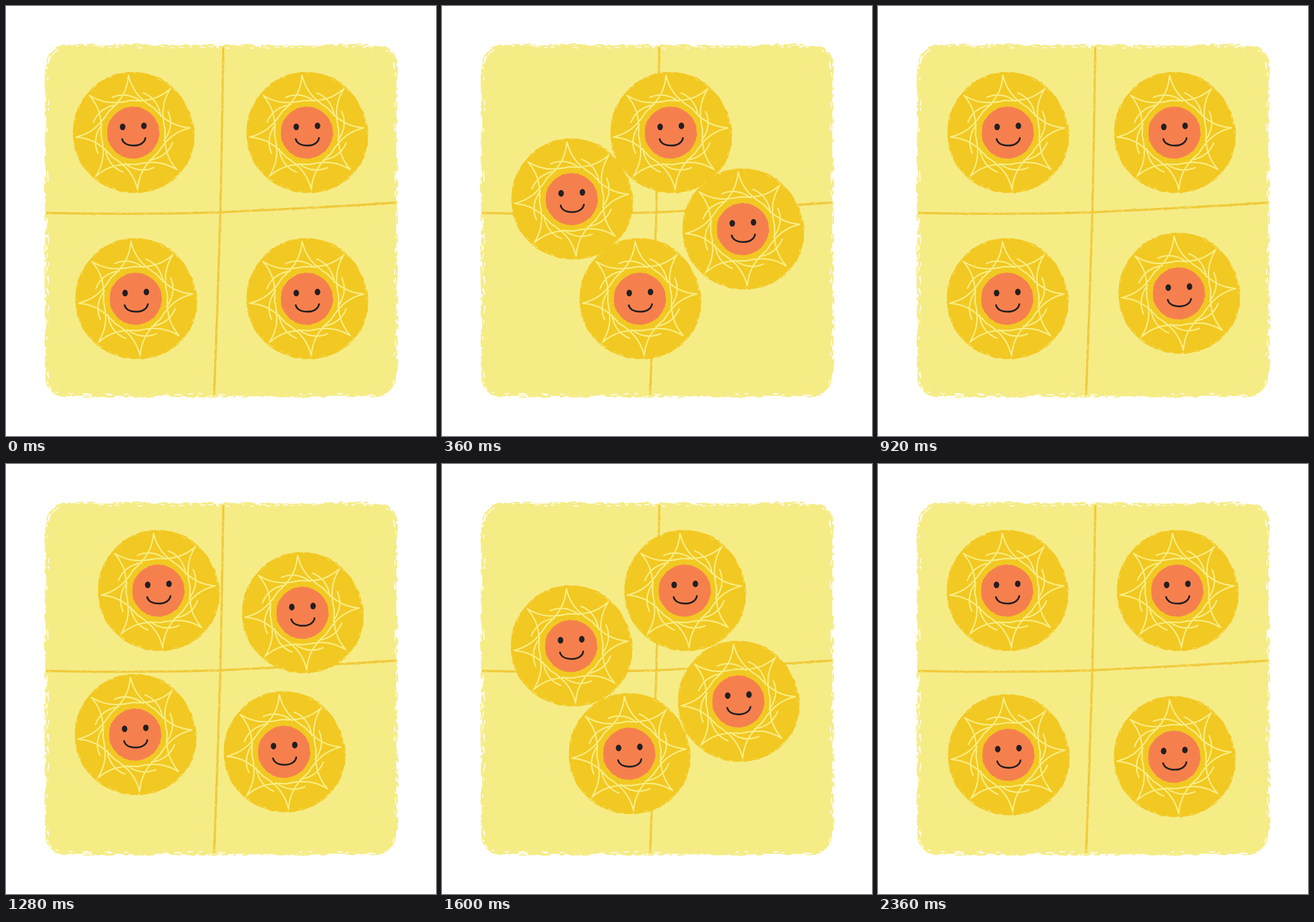
Animation of 748 by 748 pixels, one loop 2400 ms. Source, as an HTML page:

```html
<!DOCTYPE html>
<html lang="en">
<head>
<meta charset="utf-8">
<title>Circling suns</title>
<style>
html, body { margin: 0; width: 100%; height: 100%; overflow: hidden; background: #fff; }
svg { display: block; width: 748px; height: 748px; }
path { stroke-linecap: round; stroke-linejoin: round; }
</style>
</head>
<body>
<svg id="stage" viewBox="0 0 748 748"></svg>
<script>
const PALE = '#f6ec86', GOLD = '#f2c822', LINE = '#f0ca3c', INK = '#231f20';
const stage = document.getElementById('stage');

let seed = 7;
const random = () => (seed = seed * 16807 % 2147483647) / 2147483647;
const between = (a, b) => a + (b - a) * random();

function add(parent, name, attributes) {
  const node = document.createElementNS('http://www.w3.org/2000/svg', name);
  for (const key in attributes) node.setAttribute(key, attributes[key]);
  return parent.appendChild(node);
}
const stroke = (parent, d, colour, width) =>
  add(parent, 'path', { d, fill: 'none', stroke: colour, 'stroke-width': width });

// Scatter short chalk dashes along an outline, at an offset between near and far.
function chalk(parent, outline, colour, count, near, far, width, longest) {
  const total = outline.getTotalLength();
  let d = '';
  for (let i = 0; i < count; i++) {
    const start = random() * total;
    const a = outline.getPointAtLength(start);
    const b = outline.getPointAtLength(Math.min(total, start + between(2, longest)));
    const length = Math.hypot(b.x - a.x, b.y - a.y) || 1;
    const nx = (b.y - a.y) / length, ny = (a.x - b.x) / length;
    const from = between(near, far), to = from + between(-1, 1);
    d += `M${(a.x + nx * from).toFixed(1)} ${(a.y + ny * from).toFixed(1)}` +
         `L${(b.x + nx * to).toFixed(1)} ${(b.y + ny * to).toFixed(1)}`;
  }
  stroke(parent, d, colour, width);
}

function drawBoard() {
  const board = add(stage, 'path', {
    d: 'M108 69H641Q679 71 679 110V638Q678 678 640 678H108Q70 677 70 638V110Q70 71 108 69Z',
    fill: PALE
  });
  chalk(stage, board, PALE, 330, -1, 2, 2.4, 14);
  chalk(stage, board, '#fff', 120, -4, -1, 1.5, 9);
  chalk(stage, board, '#fff', 60, 0, 2, 2, 7);

  for (const d of ['M378 73C377 160 374 290 373 357C371 440 366 570 362 675',
                   'M71 360C170 362 270 362 372 359C470 354 580 349 677 342']) {
    const line = stroke(stage, d, LINE, 3.8);
    chalk(stage, line, LINE, 90, -2, 2, 1.1, 7);
    chalk(stage, line, PALE, 45, -1.7, 1.7, 0.8, 5);
  }
}

const polar = (radius, degrees) => {
  const a = degrees * Math.PI / 180;
  return `${(radius * Math.cos(a)).toFixed(1)} ${(radius * Math.sin(a)).toFixed(1)} `;
};

function drawSun(parent) {
  const sun = add(parent, 'g', { id: 'sun' });
  const disc = add(sun, 'path', {
    d: 'M0-105C59-105 106-54 106.500 5C107 63 60 105 3 105C-57 105-104 60-104.500 1C-104-57-58-105 0-105Z',
    fill: GOLD
  });
  chalk(sun, disc, GOLD, 120, -0.5, 0.5, 1, 7);
  chalk(sun, disc, PALE, 60, -2.5, -0.5, 0.8, 6);

  let rays = '';
  for (let i = 0; i < 8; i++) {
    const a = i * 45 - 94.6;
    const arm = side => `C${polar(76, a + 3 * side)}${polar(60, a + 13 * side)}${polar(56, a + 45 * side)}`;
    rays += `M${polar(99.5, a)}${arm(1)}M${polar(99.5, a)}${arm(-1)}` +
            `M${polar(71, a - 26)}Q${polar(73, a - 4)}${polar(56, a + 19)}`;
  }
  stroke(sun, rays, '#f8ed82', 2.5);

  const core = add(sun, 'path', {
    d: 'M45.300 0.300A45 45 0 1 1-44.700 0.300A45 45 0 1 1 45.300 0.300Z', fill: '#f5804e'
  });
  chalk(sun, core, '#f5804e', 60, -0.5, 0.2, 0.8, 5);
  add(sun, 'ellipse', { cx: -18.1, cy: -9.7, rx: 4.8, ry: 5.8, fill: INK });
  add(sun, 'ellipse', { cx: 18.9, cy: -11.5, rx: 4.8, ry: 5.8, fill: INK });
  stroke(sun, 'M-19 11.500C-17 19-9 22.800 1 22.800C12 22.800 20 18 21.500 9.800', INK, 3);
}

drawBoard();
drawSun(add(stage, 'defs', {}));

// Each sun travels along two sides, resting after each one.
const routes = [
  [[221, 220], [515.3, 220], [515, 509]],
  [[523, 220], [523, 499.6], [226.4, 505.7]],
  [[225.3, 509], [225.3, 220], [520.2, 220]],
  [[523, 509], [224.4, 509], [224.2, 220]]
].map(stops => ({ stops, node: add(stage, 'use', { href: '#sun' }) }));

const LOOP = 2400, LEG = 600, STEP = 40;

function render(now) {
  const time = Math.floor(now % LOOP / STEP) * STEP;
  const leg = time < 2 * LEG ? 0 : 1;
  const progress = Math.min(1, (time - leg * 2 * LEG) / LEG);
  for (const { stops, node } of routes) {
    const [from, to] = [stops[leg], stops[leg + 1]];
    const [x, y] = from.map((value, axis) => value + (to[axis] - value) * progress);
    node.setAttribute('transform', `translate(${x.toFixed(2)} ${y.toFixed(2)})`);
  }
}

const began = performance.now();
function tick() {
  render(performance.now() - began);
  requestAnimationFrame(tick);
}
tick();
</script>
</body>
</html>
```
